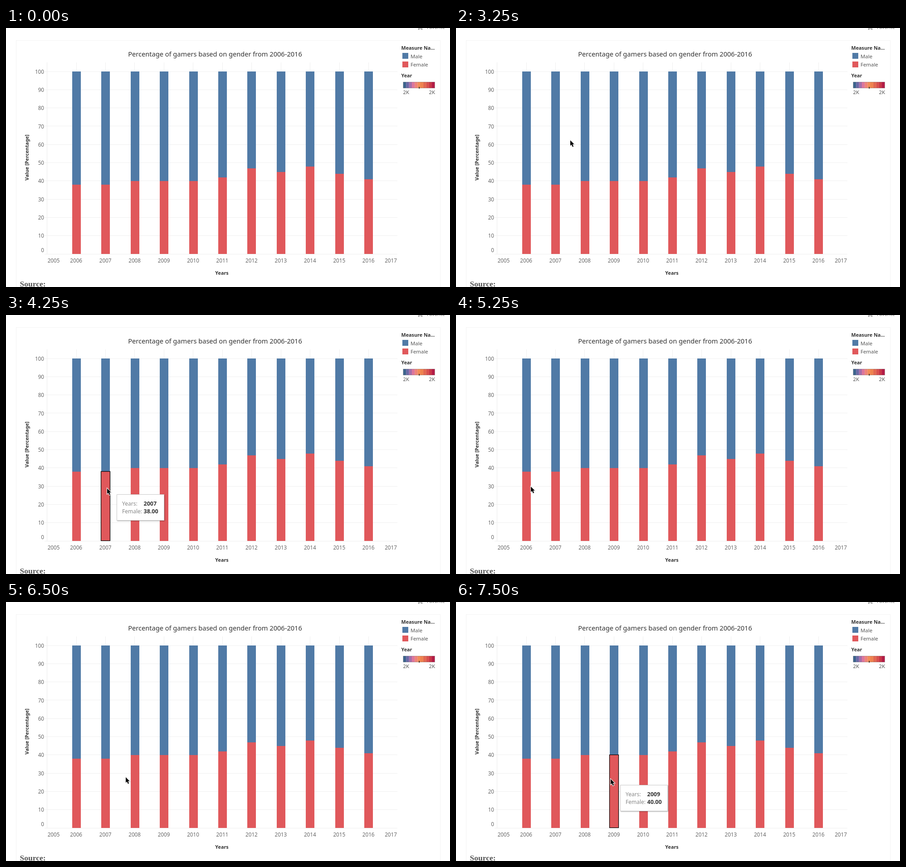
An HTML page that plays this animation: 979x572 px, repeating every 8 s.

```html
<!DOCTYPE html>
<html lang="en">
<head>
<meta charset="utf-8">
<title>Gamers by gender</title>
<style>
html, body { margin: 0; width: 100%; height: 100%; overflow: hidden; background: #fff; }
svg { display: block; font-family: "Noto Sans", "Open Sans", sans-serif; }
.tick { font-size: 11.7px; fill: #666; }
.head { font-size: 10.8px; font-weight: 600; fill: #333; }
.key { font-size: 11.4px; fill: #555; }
.tip { font-size: 12px; fill: #888; }
.val { font-size: 12.5px; font-weight: 600; fill: #333; }
</style>
</head>
<body>
<svg width="979" height="572" viewBox="0 0 979 572">
  <g id="chart"></g>
  <g id="hover"></g>
  <path id="cursor" d="M0 0V12L2.7 9.5L5 14.6L7.1 13.6L4.9 8.8H8.6Z" stroke="#fff" stroke-width="2" paint-order="stroke" style="filter:drop-shadow(0 .6px .5px #0006)"/>
</svg>
<script>
const BLUE = '#507aa6', RED = '#e0585b', LOOP = 8000;
const female = [38, 38, 40, 40, 40, 42, 47, 45, 48, 44, 41];
const ramp = ['#3d648d', '#6b69a5', '#a56faa', '#dc779c', '#ef8379', '#f28e58',
  '#ee8350', '#e2674f', '#d8504d', '#c83748', '#b31c47'];
const yOf = v => 499 - 4.03 * v;
const mid = i => 155 + 64.45 * i;
const left = i => Math.round(mid(i) - 9.25);

const rect = (x, y, w, h, fill, more = '') =>
  `<rect x="${x}" y="${y}" width="${w}" height="${h}" fill="${fill}" ${more}/>`;
const text = (x, y, s, cls, anchor = 'start', more = '') =>
  `<text x="${x}" y="${y}" class="${cls}" text-anchor="${anchor}" ${more}>${s}</text>`;
const line = (d, color) => `<path d="${d}" stroke="${color}" fill="none"/>`;

function chart() {
  let s = rect(22.5, 27.5, 935, 560, 'none', 'stroke="#f3f3f3"');
  let star = '';
  for (let k = 0; k < 10; k++) {
    const r = k % 2 ? 3 : 7, a = k * Math.PI / 5;
    star += `${913.5 + r * Math.sin(a)},${-2 - r * Math.cos(a)} `;
  }
  s += `<polygon points="${star}" fill="none" stroke="#666"/>`;
  s += text(928, 1.5, 'Favorite', '', 'start', 'font-size="10.5" fill="#777"');
  s += text(461, 62.5, 'Percentage of gamers based on gender from 2006-2016', '', 'middle',
    'font-size="14.6" font-weight="500" fill="#333"');

  s += line('M90.5 76V499', '#ececec');
  for (let v = 0; v <= 100; v += 10) {
    const y = yOf(v);
    s += line(`M85 ${Math.floor(y) + .5}H863`, '#f0f0f0');
    s += text(84, v ? y + 4.6 : 495, v, 'tick', 'end');
  }
  female.forEach((f, i) => {
    const x = left(i), y = Math.round(yOf(f));
    s += line(`M${Math.floor(mid(i)) + .5} 76V96`, '#efefef');
    s += rect(x, 96, 19, y - 96, BLUE) + rect(x, y, 19, 499 - y, RED);
    s += text(mid(i) - .3, 518, 2006 + i, 'tick', 'middle');
  });
  s += text(105, 518, 2005, 'tick', 'middle') + text(848.5, 518, 2017, 'tick', 'middle');
  s += text(476, 545, 'Years', 'head', 'middle');
  s += text(0, 0, 'Value [Percentage]', 'head', 'middle', 'transform="translate(50 286) rotate(-90)"');

  s += text(871.5, 47.5, 'Measure Na...', 'head');
  s += rect(874, 55, 13, 13, BLUE) + text(892, 66.5, 'Male', 'key');
  s += rect(874, 74, 13, 13, RED) + text(892, 85.3, 'Female', 'key');
  s += text(871.5, 109, 'Year', 'head');
  ramp.forEach((c, k) => s += rect(876 + k * 6.3, 119, 6.5, 14, c));
  s += rect(875.5, 119.5, 70, 13, 'none', 'stroke="#888" stroke-opacity=".5"');
  s += rect(910.5, 130, 1.5, 4, '#222');
  s += text(875.5, 146, '2K', 'key') + text(946, 146, '2K', 'key', 'end');
  s += text(30.5, 571, 'Source:', '', 'start',
    'font-family="Liberation Serif, serif" font-size="17.5" font-weight="700" fill="#555"');
  return s;
}

// Pointer steps: time, x, y, hovered bar, hovered part
const steps = [
  [500, 258, 232], [750, 229, 260], [1000, 158, 258], [1250, 144, 255], [1500, 148, 251],
  [3250, 252, 248], [3500, 218, 246, 1, 'Male'], [3750, 215, 247, 1, 'Male'],
  [4000, 218, 316, 1, 'Male'], [4250, 223, 383, 1, 'Female'], [5250, 165, 379],
  [5500, 151, 378, 0, 'Female'], [5750, 149, 378, 0, 'Female'], [6000, 213, 381, 1, 'Female'],
  [6250, 242, 387], [6500, 264, 387], [6750, 285, 388, 2, 'Female'],
  [7000, 288, 391, 2, 'Female'], [7250, 314, 391], [7500, 341, 391, 3, 'Female']
];

function hoverBox(x, y, i, part) {
  const isMale = part === 'Male', split = Math.round(yOf(female[i]));
  const top = isMale ? 95.5 : split - .5, bottom = isMale ? split + .5 : 498.5;
  const bx = x + 21.5, by = y + 13.5, col = isMale ? 50 : 59;
  const value = isMale ? 100 - female[i] : female[i];
  return rect(left(i) - .5, top, 20, bottom - top, 'none', 'stroke="#000" stroke-width="1.2"') +
    rect(bx, by, col + 45, 57, '#fff', 'stroke="#ccc" style="filter:drop-shadow(1px 1px 1px #0005)"') +
    text(bx + 11.5, by + 24.5, 'Years:', 'tip') + text(bx + col, by + 24.5, 2006 + i, 'val') +
    text(bx + 11.5, by + 41.5, part + ':', 'tip') + text(bx + col, by + 41.5, value.toFixed(2), 'val');
}

const byId = id => document.getElementById(id);
const hover = byId('hover'), cursor = byId('cursor');
byId('chart').innerHTML = chart();

let shown = null;
const start = performance.now();
function frame() {
  const t = Math.max(0, performance.now() - start) % LOOP;
  const step = steps.filter(p => p[0] <= t).pop();
  if (step !== shown) {
    shown = step;
    const [, x = 0, y = 0, bar, part] = step || [];
    cursor.setAttribute('visibility', step ? 'visible' : 'hidden');
    cursor.setAttribute('transform', `translate(${x} ${y})`);
    hover.innerHTML = part ? hoverBox(x, y, bar, part) : '';
  }
  requestAnimationFrame(frame);
}
cursor.setAttribute('visibility', 'hidden');
frame();
</script>
</body>
</html>
```
